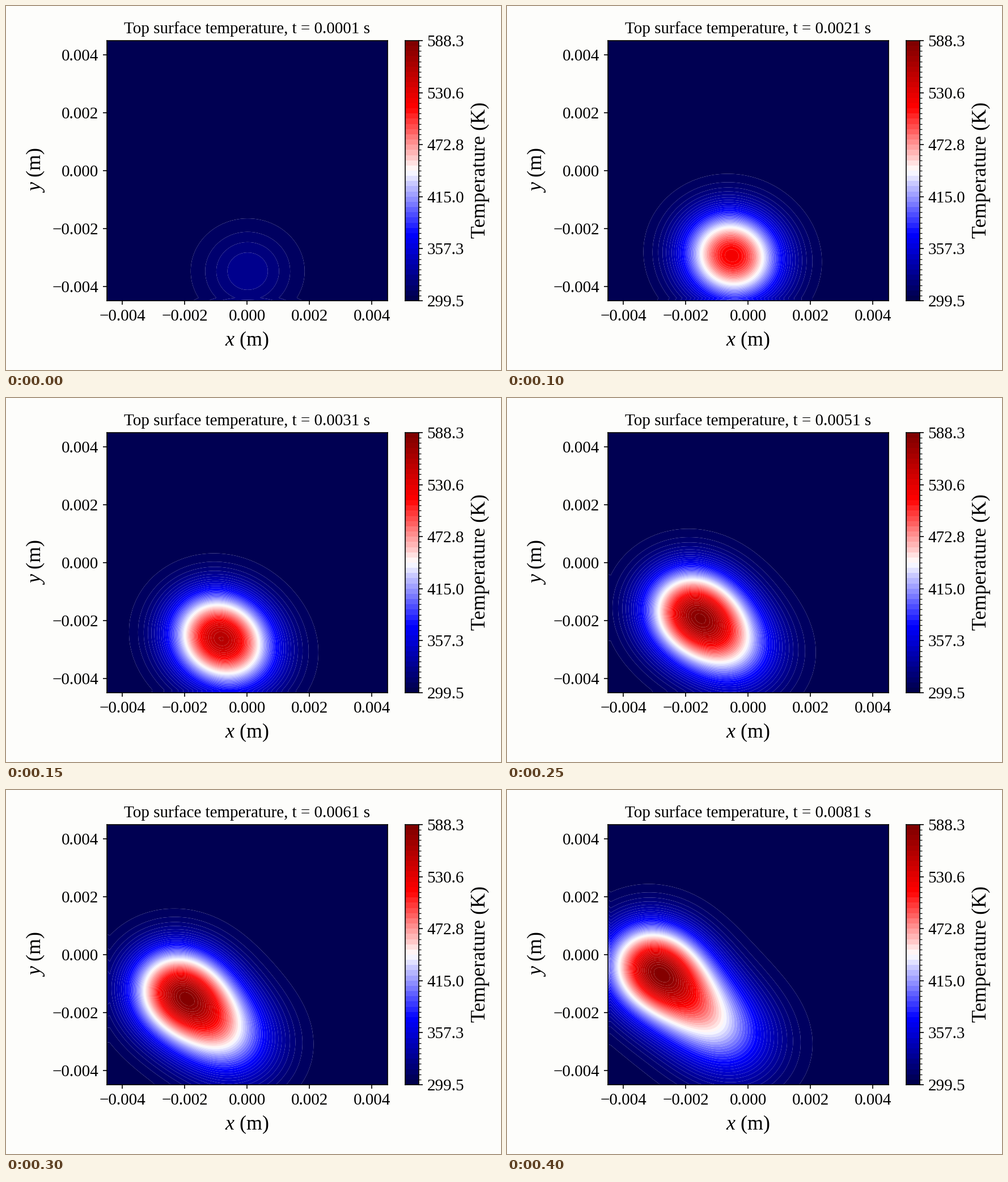
A matplotlib script that plays this animation: 873 by 641 pixels, repeating every 0.45 s.

```python
import numpy as np
import matplotlib.pyplot as plt
from matplotlib.animation import FuncAnimation
from matplotlib.ticker import FuncFormatter

W, H, DPI = 873, 641, 150
FRAMES, INTERVAL = 9, 50
T_AMB, T_LOW, T_HIGH = 300.0, 299.52, 588.33
BACK = "#fdfdfb"

plt.rcParams.update({
    "font.family": "Liberation Serif",
    "font.size": 14,
    "mathtext.fontset": "custom",
    "mathtext.rm": "Liberation Serif",
    "mathtext.it": "Liberation Serif:italic",
    "axes.linewidth": 0.8,
})

# Moving Gaussian heat source; lengths in mm, times in ms
START = (0.04, -3.5)
SPEED = 0.424        # along -x and +y
SPOT = 2.0           # squared 1/e radius
ALPHA = 0.012        # diffusivity
POWER = 106.0
DEPTH = 0.098        # time for heat to leave the surface layer
LOSS = 45.0          # decay time of the remaining heat

axis = np.linspace(-4.5, 4.5, 91)
X, Y = np.meshgrid(axis, axis)
rim = (np.abs(X) > 4.49) | (np.abs(Y) > 4.49)
levels = np.linspace(T_LOW, T_HIGH, 51)


def temperature(t, steps=160):
    """Surface temperature, integrated over the age of the deposited heat."""
    u = np.linspace(np.sqrt(DEPTH), np.sqrt(t + DEPTH), steps + 1)
    du = u[1] - u[0]
    rise = np.zeros_like(X)
    for mid in (u[:-1] + u[1:]) / 2:
        age = mid ** 2 - DEPTH
        path = SPEED * (t - age)
        r2 = (X - START[0] + path) ** 2 + (Y - START[1] - path) ** 2
        width = SPOT + 4 * ALPHA * age
        part = 2 * POWER * du * SPOT / width * np.exp(-r2 / width - age / LOSS)
        rise += part * np.where(rim, 1 + 0.5 * np.exp(-age), 1)
    return np.minimum(T_AMB + rise, T_HIGH - 0.01)


def box(x0, y0, x1, y1):
    return [x0 / W, 1 - y1 / H, (x1 - x0) / W, (y1 - y0) / H]


def label(x, y, s, **kw):
    fig.text(x / W, 1 - y / H, s, fontsize=17.3, ha="center", va="center", **kw)


fig = plt.figure(figsize=(W / DPI, H / DPI), dpi=DPI, facecolor=BACK)

ax = fig.add_axes(box(177.5, 61, 673, 519), facecolor=BACK)
ax.set(xlim=(-4.5, 4.5), ylim=(-4.5, 4.5))
metres = FuncFormatter(lambda v, _: f"{v / 1000:.3f}".replace("-", "\u2212"))
for side in (ax.xaxis, ax.yaxis):
    side.set_ticks([-4, -2, 0, 2, 4])
    side.set_major_formatter(metres)
title = ax.set_title("", fontsize=14)
label(425, 589, "$x$ (m)")
label(52, 289, "$y$ (m)", rotation=90)

bar = fig.add_axes(box(703.5, 61, 728, 519))
bar.pcolormesh([0, 1], levels, np.arange(50)[:, None], cmap="seismic")
bar.set(xlim=(0, 1), ylim=(T_LOW, T_HIGH), xticks=[])
bar.yaxis.tick_right()
bar.set_yticks(levels[::10], [f"{v:.1f}" for v in levels[::10]])
bar.set_yticks(levels, minor=True)
label(836, 289, "Temperature (K)", rotation=90)

shown = []


def draw(i):
    while shown:
        shown.pop().remove()
    t = 0.1 + i
    shown.append(ax.contourf(X, Y, temperature(t), levels=levels,
                             cmap="seismic", antialiased=True))
    title.set_text(f"Top surface temperature, t = {t / 1000:.4f} s")
    return [title]


anim = FuncAnimation(fig, draw, frames=FRAMES, interval=INTERVAL,
                     repeat=True, repeat_delay=0, blit=False)
plt.show()
```
